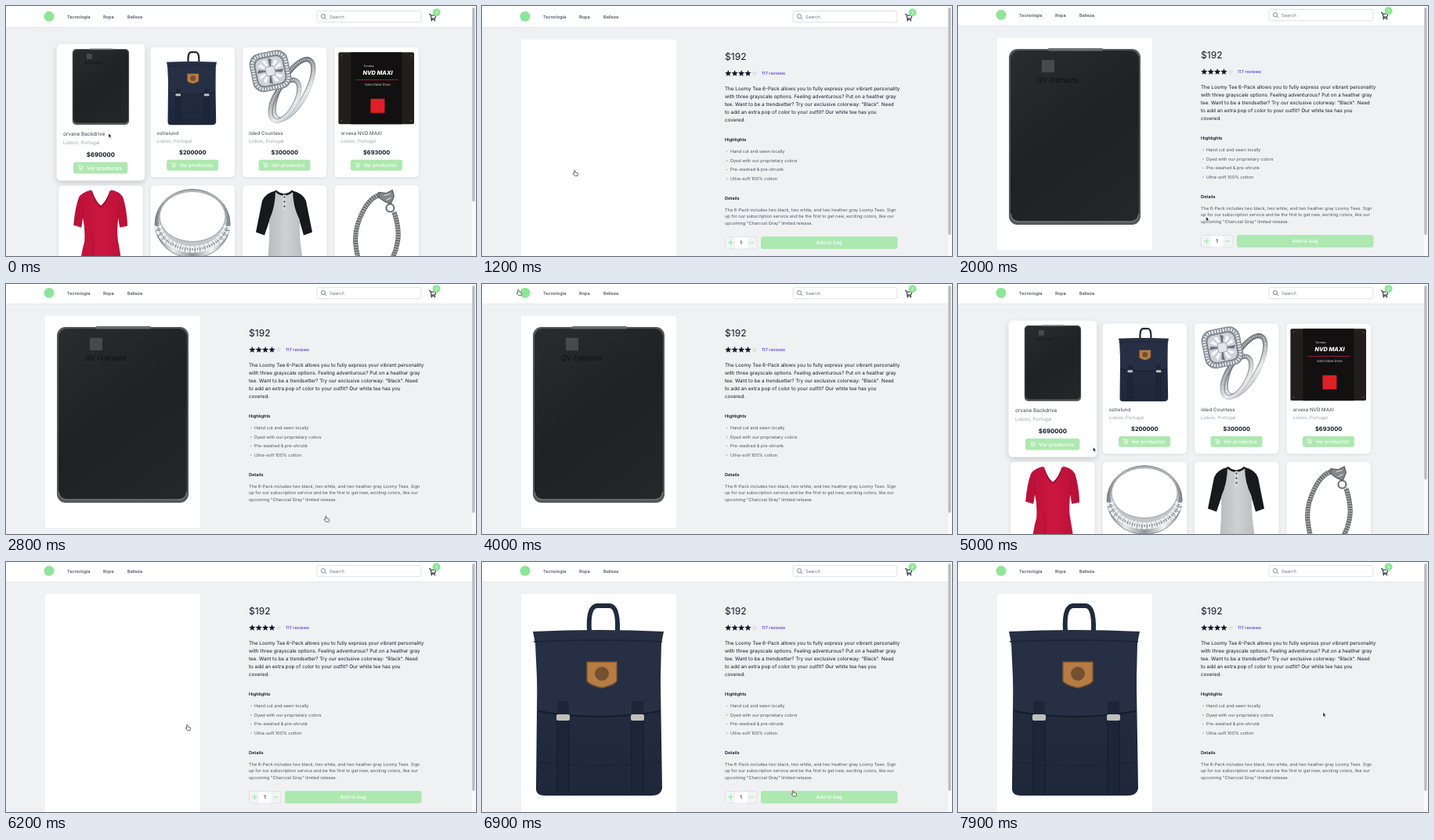
An HTML page with a canvas for the animation above (8 s loop, 600 by 320 pixels).

```html
<!DOCTYPE html>
<html lang="es">
<head>
<meta charset="utf-8">
<title>Shop</title>
<style>
  html, body { margin: 0; width: 100%; height: 100%; overflow: hidden; background: #fff; }
  canvas { display: block; }
</style>
</head>
<body>
<canvas id="stage" width="600" height="320"></canvas>
<script>
const ctx = document.getElementById('stage').getContext('2d');
const LOOP = 8000, GREEN = '#8ee598', PALE = '#aee8b1', INK = '#111827';

// Drawing helpers
function box(x, y, w, h, fill, r = 0, stroke) {
  ctx.beginPath();
  ctx.roundRect(x, y, w, h, r);
  if (fill) { ctx.fillStyle = fill; ctx.fill(); }
  if (stroke) { ctx.strokeStyle = stroke; ctx.lineWidth = .7; ctx.stroke(); }
}
function shape(d, fill, stroke, width = 1) {
  const path = new Path2D(d);
  if (fill) { ctx.fillStyle = fill; ctx.fill(path); }
  if (stroke) { ctx.strokeStyle = stroke; ctx.lineWidth = width; ctx.stroke(path); }
}
function oval(x, y, rx, ry, fill, stroke, width = 1, turn = 0, from = 0, to = 2 * Math.PI) {
  ctx.beginPath();
  ctx.ellipse(x, y, rx, ry, turn, from, to);
  if (fill) { ctx.fillStyle = fill; ctx.fill(); }
  if (stroke) { ctx.strokeStyle = stroke; ctx.lineWidth = width; ctx.stroke(); }
}
function text(s, x, y, size, color, weight = 400, align = 'left', style = '') {
  ctx.font = `${style} ${weight} ${size}px Inter, sans-serif`;
  ctx.textAlign = align;
  ctx.fillStyle = color;
  ctx.fillText(s, x, y + size * .36);
}
function at(x, y, scale, draw) {
  ctx.save();
  ctx.translate(x, y);
  ctx.scale(scale, scale);
  draw();
  ctx.restore();
}
function shadow(color, blur, y) {
  ctx.shadowColor = color;
  ctx.shadowBlur = blur;
  ctx.shadowOffsetY = y;
}
function gradient(x0, y0, x1, y1, ...colors) {
  const g = ctx.createLinearGradient(x0, y0, x1, y1);
  colors.forEach((c, i) => g.addColorStop(i / (colors.length - 1), c));
  return g;
}
function dashed(pattern, draw) {
  ctx.setLineDash(pattern);
  draw();
  ctx.setLineDash([]);
}

// Products
function drive() {
  box(0, 1, 168, 225, '#55585a', 11);
  box(2, 3, 164, 219, gradient(0, 0, 168, 226, '#2b2c2e', '#202123', '#262729'), 11);
  box(50, 0, 70, 3.5, '#6b6e70', 1);
  shape('M2 212 Q3 221 12 222 L156 222 Q165 221 166 212', null, '#737678', 1.6);
  box(42, 15, 16, 16, '#48494c');
  text('QV Ostrants', 36, 41, 9.2, '#0d0e10');
}
function backpack() {
  shape('M72 34 Q70 3 82 2 L98 2 Q109 3 108 34', null, '#212b3d', 6);
  shape('M6 45 L162 45 L165 236 Q163 245 152 245 L15 245 Q3 245 4 234Z', gradient(0, 45, 0, 244, '#252f43', '#1f283a'));
  shape('M0 35 Q84 31 167 35 L164 50 L162 136 Q84 150 7 136 L3 50Z', '#262f43');
  shape('M1 48 Q84 44 165 48', null, '#1a2334', 1.5);
  shape('M7 137 Q84 151 162 137', null, '#141c2a', 2);
  shape('M7 202 Q84 211 163 202', null, '#182133', 1.2);
  for (const x of [31, 126]) {
    box(x, 124, 15, 119, '#1d2638');
    shape(`M${x} 140 V242 M${x + 15} 140 V242`, null, '#131a28', 1);
    box(x - 1, 141, 17, 8, '#bfc0bb', 2);
  }
  shape('M69 74 H107 V98 Q105 103 88 107 Q71 103 69 98Z', '#b57c45', '#865628', 1.5);
  oval(88, 89, 9, 9, '#76502e');
}
function stoneRing() {
  const silver = gradient(30, 20, 92, 90, '#c9cdd1', '#5f656b', '#dfe2e5', '#666c72');
  for (const [x, y, rx, ry, turn] of [[65, 54, 17, 43, .5], [54, 68, 14, 29, .5]]) {
    oval(x, y, rx, ry, null, silver, 6, turn);
    dashed([1.2, 1.3], () => oval(x, y, rx, ry, null, '#ffffffb0', 3, turn));
    oval(x, y, rx - 3, ry - 3, null, '#6a7076', .7, turn);
  }
  ctx.save();
  ctx.translate(35.5, 30.5);
  ctx.rotate(-.2);
  box(-25, -25, 50, 50, '#878e95', 14);
  dashed([2, 1.5], () => {
    ctx.lineWidth = 4;
    ctx.strokeStyle = '#e4e7ea';
    ctx.beginPath();
    ctx.roundRect(-21.5, -21.5, 43, 43, 12);
    ctx.stroke();
  });
  box(-18, -18, 36, 36, '#cdd2d7', 9, '#5d646b');
  for (let i = 0; i < 12; i++) {
    const a = i * Math.PI / 6;
    shape(`M0 0 L${17 * Math.cos(a)} ${17 * Math.sin(a)} L${15 * Math.cos(a + .28)} ${15 * Math.sin(a + .28)}Z`, i % 3 ? '#f7f8f9' : '#6b737b');
  }
  box(-6, -6, 12, 12, '#e3e7ea', 3, '#7d858c');
  ctx.restore();
}
function diskCard() {
  box(5, 6.5, 96.6, 92, '#231e1e', 2);
  box(21, 6.5, 65, 92, '#131012');
  for (const x of [9, 98]) for (const y of [11, 94]) oval(x, y, 1.2, 1.2, '#453d3c');
  text('Torvexa', 37, 24, 3.4, '#ddd', 500);
  text('NVD MAXI', 36, 33, 7.3, '#fff', 800, 'left', 'italic');
  box(27, 41.5, 54, .8, '#c8202a');
  text('Solid State Drive', 55, 48, 4.2, '#d6d3d3', 400, 'center');
  box(46, 66, 18, 18, '#dd2027');
}
function tee() {
  shape('M41 6 Q48 22 54 26 Q61 20 67 6 Q78 8 82 15 Q87 30 88 52 L78 54 L76 42 Q74 62 76 72 Q79 88 81 105 H27 Q29 85 33 72 Q34 55 31 42 L29 54 L19 51 Q21 28 26 15 Q30 9 41 6Z',
    gradient(19, 0, 88, 0, '#b90f36', '#cb1740', '#b90f36'));
  shape('M42 7 Q48 24 54 28 Q61 22 66 7', null, '#8f0b2a', 1.2);
  shape('M31 42 Q32 32 29 25 M76 42 Q75 32 78 25 M40 60 Q46 72 43 92', null, '#9d0d2e', .8);
}
function band() {
  const metal = gradient(5, 0, 102, 0, '#777d82', '#e9ebec', '#8f9599', '#f3f4f4', '#7b8186');
  oval(53.5, 49, 48, 44, metal, '#6f757a', .8);
  oval(53.5, 45, 44, 39, '#c3c7ca', '#8d9398', .8);
  oval(53.5, 40, 42, 32, '#fff', '#8d9398', .8);
  dashed([5, 1.2], () => oval(53.5, 46, 45, 36, null, '#eceeef', 9, 0, .15, Math.PI - .15));
  dashed([1.2, 2], () => oval(53.5, 46, 45, 36, null, '#7d8388', 3, 0, .15, Math.PI - .15));
}
function raglan() {
  shape('M42 7 Q29 10 25 20 L17 60 L28 64 L35 43 Q43 25 42 7Z M64 7 Q77 10 81 20 L89 60 L78 64 L72 43 Q63 25 64 7Z', '#18191c');
  shape('M42 7 Q42 27 34 45 Q35 75 31 105 H79 Q72 75 73 45 Q64 27 64 7 Q53 15 42 7Z', gradient(31, 0, 79, 0, '#b9babd', '#cfd0d2', '#b9babd'));
  shape('M42 7 Q53 17 64 7', null, '#18191c', 2.4);
  box(51.5, 12, 4, 20, '#d9d9db');
  for (let y = 15; y < 32; y += 6) oval(53.5, y, 1, 1, '#222');
}
function bracelet() {
  const loop = 'M60 12 Q46 14 36 34 Q25 55 27 75 Q29 95 36 110 M76 34 Q84 58 80 75 Q76 95 64 106';
  shape(loop, null, '#606365', 6);
  dashed([1.4, 1.8], () => shape(loop, null, '#c9cbcc', 4.5));
  shape(loop, null, '#77797b88', 1.6);
  oval(71, 29, 5, 5, null, '#696c6f', 2);
  shape('M56 9 L66 10 L74 6 L76 14 L72 24 L64 21 L57 16Z', '#84878a', '#46484a', 1);
  shape('M63 13 L71 11 M66 19 L72 16', null, '#dcdddd', 1.2);
}

const products = [
  ['orvane Backdrive', '$690000', () => at(19.3, 5.7, .41, drive)],
  ['ostrelund', '$200000', () => at(20.4, 5.5, .383, backpack)],
  ['ilded Countess', '$300000', stoneRing],
  ['orvexa NVD MAXI', '$693000', diskCard],
  ['', '', tee], ['', '', band], ['', '', raglan], ['', '', bracelet]
];

// Page parts
function cartIcon(x, y, scale, color) {
  at(x, y, scale, () => {
    shape('M0 .5 H1.8 L3.2 6 H8 L9 2 H2.3 M3.2 6 L2.6 7.3 H8.2', null, color, 1);
    oval(3.4, 8.8, .8, .8, color);
    oval(7.6, 8.8, .8, .8, color);
  });
}
function header(dy, count) {
  box(0, 0, 600, 25 + dy, '#fff');
  box(0, 25 + dy, 595, .7, '#e4e6ea');
  at(0, dy - 1.7, 1, () => {
    oval(55, 13, 6.5, 6.5, GREEN);
    [['Tecnología', 78], ['Ropa', 124], ['Belleza', 155]].forEach(([s, x]) => text(s, x, 13.5, 5.6, '#374151', 500));
    box(397, 6, 133, 14.5, '#fff', 2.5, '#cdd2d9');
    oval(405, 12.8, 2.6, 2.6, null, '#6b7280', .8);
    shape('M407 14.8 L409.2 17', null, '#6b7280', .8);
    text('Search', 413, 13.5, 5.7, '#6b7280');
    cartIcon(540, 9.8, .98, INK);
    oval(549.6, 8, 5, 5, GREEN);
    text(count, 549.6, 8, 5, '#fff', 500, 'center');
  });
}
function scrollbar(bottom) {
  box(595, 0, 5, 320, '#fafafb');
  box(595.2, 2, 3.4, bottom - 2, '#b9bbbe', 1.7);
}
function skeleton() {
  for (let i = 0; i < 8; i++) at(73.5 + 117.4 * (i % 4), 58.5 + 180.5 * (i >> 2), 1, () => {
    box(0, 0, 104, 157, '#e2e6ec', 2.5, '#d2d7df');
    for (const [y, w, h] of [[7, 91, 87], [101.5, 58, 4], [111, 58, 4], [119.5, 91, 4], [128.5, 91, 20]])
      box(6.7, y, w, h, '#cbd3df', 1.5);
  });
}
function card([title, price, draw], x, y, hover) {
  const w = 107.4, h = 166.5;
  ctx.save();
  ctx.translate(x + w / 2, y + h / 2);
  ctx.scale(1 + .05 * hover, 1 + .05 * hover);
  ctx.translate(-w / 2, -h / 2);
  shadow(`rgba(0,0,0,${.09 + .07 * hover})`, 4 + 3 * hover, 1 + 2 * hover);
  box(0, 0, w, h, '#fff', 5);
  shadow('transparent', 0, 0);
  draw();
  text(title, 8, 109.6, 6.2, '#374151');
  text('Lisbon, Portugal', 8, 120.1, 5.8, '#9ca3af');
  text(price, 53.7, 134.9, 7.4, INK, 700, 'center');
  box(20.5, 144, 66, 14, PALE, 3);
  cartIcon(26, 147.5, .68, '#fff');
  text('Ver productos', 37, 151.1, 6.3, '#fff', 500);
  ctx.restore();
}
function catalog(dy, hovers) {
  for (let i = 7; i >= 0; i--)
    card(products[i], 67.2 + 117.4 * (i % 4), 50.8 + 176.7 * (i >> 2) + dy, hovers[i] || 0);
}
function star(x, y, color) {
  let d = '';
  for (let i = 0; i < 10; i++) {
    const r = i % 2 ? 1.9 : 4.3, a = i * Math.PI / 5 - Math.PI / 2;
    d += `${i ? 'L' : 'M'}${x + r * Math.cos(a)} ${y + r * Math.sin(a)}`;
  }
  shape(d + 'Z', color);
}
const about = ['The Loomy Tee 6-Pack allows you to fully express your vibrant personality',
  'with three grayscale options. Feeling adventurous? Put on a heather gray',
  'tee. Want to be a trendsetter? Try our exclusive colorway: "Black". Need',
  'to add an extra pop of color to your outfit? Our white tee has you', 'covered.'];
const highlights = ['Hand cut and sewn locally', 'Dyed with our proprietary colors',
  'Pre-washed & pre-shrunk', 'Ultra-soft 100% cotton'];
const details = ['The 6-Pack includes two black, two white, and two heather gray Loomy Tees. Sign',
  'up for our subscription service and be the first to get new, exciting colors, like our',
  'upcoming "Charcoal Gray" limited release.'];

function productPage(dy, picture, height, canBuy) {
  ctx.save();
  ctx.translate(0, dy);
  box(50, 41, 198, height, '#fff');
  if (picture) at(65, 54, 1, picture);
  text('$192', 310, 62.5, 12.1, INK);
  for (let i = 0; i < 5; i++) star(314.3 + 8.4 * i, 84.3, i < 4 ? INK : '#dfe2e6');
  text('117 reviews', 357, 84.2, 5.6, '#4f3fd8', 500);
  about.forEach((s, i) => text(s, 310, 103.3 + 10 * i, 6.35, INK));
  text('Highlights', 310, 169, 5.6, INK, 600);
  highlights.forEach((s, i) => {
    oval(312.8, 184.3 + 11.6 * i, .8, .8, '#9ca3af');
    text(s, 317, 184.2 + 11.6 * i, 5.6, '#4b5563');
  });
  text('Details', 310, 244, 5.6, INK, 600);
  details.forEach((s, i) => text(s, 310, 259 + 8.3 * i, 5.6, '#4b5563'));
  if (canBuy) {
    box(310.4, 293.4, 40.5, 15.4, '#f1f4f3', 2, '#d9dde1');
    box(323, 294, 15.5, 14.4, '#fff');
    shape('M314 301 H321 M317.5 297.5 V304.5 M341 301 H347', null, GREEN, .9);
    text('1', 330.6, 301.2, 6.3, INK, 500, 'center');
    box(356, 293, 174.5, 16, PALE, 3);
    text('Add to bag', 443.3, 301.2, 6.3, '#fff', 500, 'center');
  }
  ctx.restore();
}

// Pointer: time, x, y of its tip
const pointerKeys = [[0, 131, 163], [100, 131, 163], [800, 118, 210], [1500, 118, 210], [2300, 408, 297],
  [3200, 408, 297], [3900, 46, 7], [4500, 46, 7], [4980, 172.5, 209], [5250, 172.5, 209], [5950, 231, 208],
  [6350, 231, 208], [7000, 408, 298], [7300, 408, 298], [7880, 466, 192.5], [LOOP, 466, 192.5]];
const handTimes = [[450, 1550], [2150, 3250], [3800, 4560], [5800, 6400], [6900, 7350]];

const clamp = v => Math.min(1, Math.max(0, v));
const ease = v => v * v * (3 - 2 * v);
const ramp = (t, from, to) => ease(clamp((t - from) / (to - from)));

function pointer(t) {
  const i = pointerKeys.findIndex(k => k[0] > t);
  const [t0, x0, y0] = pointerKeys[i - 1], [t1, x1, y1] = pointerKeys[i];
  const p = ramp(t, t0, t1);
  const hand = handTimes.some(([a, b]) => t >= a && t < b);
  at(x0 + (x1 - x0) * p, y0 + (y1 - y0) * p, 1, () => {
    if (hand) shape('M-.3 .5 Q.6 -.3 1.1 .6 V3 L4.3 3.8 Q4.8 4 4.6 5 L4 7.4 H.3 L-2 4.6 Q-1.7 3.8 -.4 4.8Z', '#fff', '#333', .7);
    else shape('M0 0 V5.4 L1.2 4.3 L2.1 6.3 L3 5.9 L2.1 4 H3.8Z', '#111', '#fff', .4);
  });
}

function draw(now) {
  const t = now % LOOP;
  const dy = t < 1500 ? 2 : 0;
  const onProduct = t >= 1000 && t < 4400 || t >= 6200;
  ctx.textRendering = 'geometricPrecision';
  box(0, 0, 600, 320, '#f0f1f3');
  if (!onProduct) {
    if (t >= 4400 && t < 4600) skeleton();
    else catalog(dy, t < 1000 ? [1] : [ramp(t, 4780, 4960) - ramp(t, 5350, 5500), ramp(t, 5450, 5620)]);
  } else if (t < 4400) {
    productPage(dy, t >= 1500 && drive, t < 1500 ? 280 : 271, t < 2700);
  } else {
    productPage(dy, t >= 6500 && backpack, 280, t < 7300);
  }
  header(dy, t < 2700 ? 1 : t < 7300 ? 2 : 3);
  scrollbar(onProduct ? 293 : 250.5);
  pointer(t);
  requestAnimationFrame(draw);
}
requestAnimationFrame(draw);
</script>
</body>
</html>
```
